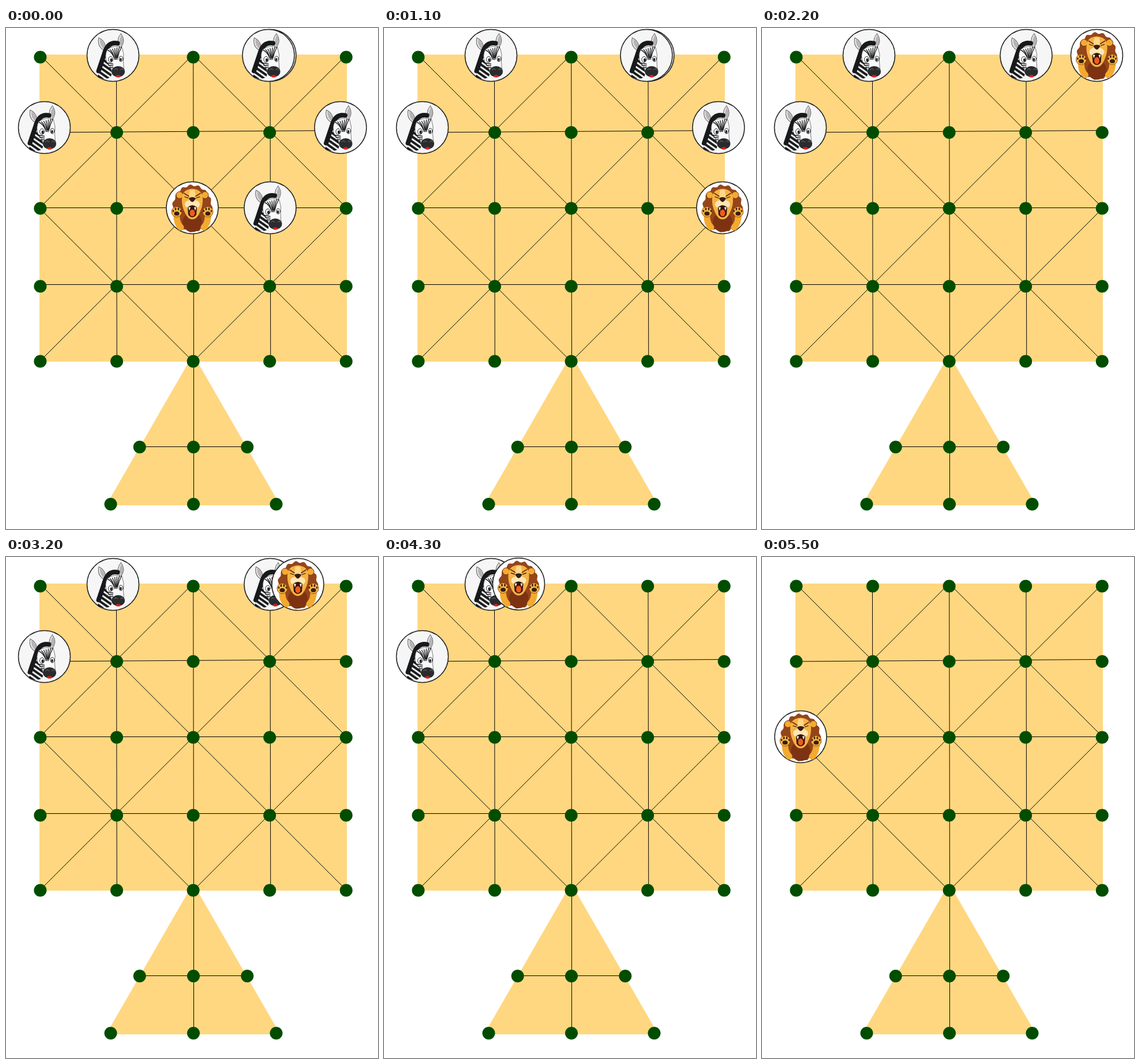
Write an HTML page that moves like this. It is 645x868 px and loops after 6500 ms.

```html
<!DOCTYPE html>
<html lang="en">
<head>
<meta charset="utf-8">
<title>Lion and zebras</title>
<style>
html, body { margin: 0; width: 100%; height: 100%; overflow: hidden; background: #fff; }
svg { display: block; width: 645px; height: 868px; }
</style>
</head>
<body>
<svg viewBox="0 0 645 868">
  <defs>
    <pattern id="stripes" width="7" height="7" patternUnits="userSpaceOnUse" patternTransform="rotate(35)">
      <path d="M0 0H7V4H0Z" fill="#1a1b1d"/>
    </pattern>
    <path id="leaf" d="M0 0Q-10-12 0-25Q10-12 0 0Z"/>
    <g id="ear">
      <use href="#leaf" fill="#e2e2e2" stroke="#555" stroke-width=".9"/>
      <use href="#leaf" transform="translate(1 -2) scale(.6 .8)" fill="#b9b1b4"/>
    </g>

    <g id="zebra" stroke-linecap="round" stroke-linejoin="round">
      <circle r="45" fill="#f6f6f6" stroke="#222" stroke-width="1.5"/>
      <use href="#ear" transform="translate(-14 -8) rotate(-25)"/>
      <use href="#ear" transform="translate(13 -13) rotate(2)"/>
      <path d="M-13-4Q-18 20-28 38Q-16 43-4 38L4 12Z" fill="#eee"/>
      <path d="M-13-4Q-18 20-28 38Q-16 43-4 38L4 12Z" fill="url(#stripes)"/>
      <path d="M8-21Q-8-24-14-6T-25 27" fill="none" stroke="#17191b" stroke-width="8"/>
      <path d="M-10-10Q3-20 16-13Q20-2 18 11L19 25Q12 34-2 29Q-4 18-11 11Q-15 0-10-10Z" fill="#fafafa" stroke="#444" stroke-width=".7"/>
      <path id="fan" fill="none" stroke="#202224" stroke-width="1.4"/>
      <g fill="#fff" stroke="#222">
        <ellipse cx="-4" cy="7" rx="4" ry="5"/>
        <ellipse cx="14" cy="6" rx="3.4" ry="4.6"/>
      </g>
      <g fill="#222">
        <ellipse cx="-3" cy="8" rx="2" ry="3"/>
        <ellipse cx="13.5" cy="7" rx="1.8" ry="2.8"/>
      </g>
      <ellipse cx="9" cy="28" rx="11.5" ry="9.5" fill="#2a2b2e"/>
      <path d="M2 25Q5 21 8 25M13 25Q16 21 18 25" fill="none" stroke="#77797d"/>
      <ellipse cx="9" cy="36" rx="4" ry="2.2" fill="#d4201c"/>
    </g>

    <g id="lion" stroke-linecap="round" stroke-linejoin="round">
      <circle r="45" fill="#fff" stroke="#222" stroke-width="1.5"/>
      <path id="mane" fill="#95451a"/>
      <ellipse cy="25" rx="17" ry="17" fill="#7d3312"/>
      <g id="side">
        <circle cx="-22" cy="-22" r="6" fill="#f3ab30" stroke="#7a3212"/>
        <path d="M-27 12Q-28 26-20 34" fill="none" stroke="#f3aa2e" stroke-width="11"/>
        <circle cx="-27" cy="7" r="9" fill="#f7b73f" stroke="#7a3212" stroke-width=".8"/>
        <ellipse cx="-27" cy="10" rx="4.5" ry="3.5" fill="#3a1d0d"/>
        <path d="M-33 5V6M-29 1V3M-24 1V3M-20 5V6" stroke="#3a1d0d" stroke-width="2.6"/>
      </g>
      <use href="#side" transform="scale(-1 1)"/>
      <path d="M0-33Q17-32 18-17Q19-4 13 8Q8 20 0 20Q-8 20-13 8Q-19-4-18-17Q-17-32 0-33Z" fill="#f5b344"/>
      <path d="M-4-31H4L7-16H-7Z" fill="#ffd789"/>
      <path d="M-14-25L-6-20M14-25L6-20" stroke="#6d2b0e" stroke-width="1.8"/>
      <path d="M-13-19L-7-17M13-19L7-17" stroke="#221408" stroke-width="1.3"/>
      <ellipse cy="-6" rx="13" ry="8" fill="#ffe6b5"/>
      <path d="M-6-17Q0-20 6-17Q4-11 0-10Q-4-11-6-17Z" fill="#3a1b10"/>
      <path d="M-8-1Q0-8 8-1L7 12Q0 21-7 12Z" fill="#351309"/>
      <ellipse cy="9" rx="4.5" ry="6" fill="#f15a1e"/>
      <path d="M-7-1H-3L-5 5ZM7-1H3L5 5Z" fill="#fff"/>
    </g>
  </defs>

  <path d="M58 46H591V578H58ZM324.5 565.5L475.5 827H173.5Z" fill="#ffd780"/>
  <path id="lines" fill="none" stroke="#000"/>
  <g id="dots" fill="#004d00"></g>
  <g id="pieces"></g>
</svg>
<script>
const HOLD = 1000, HOP = 100, LOOP = 6500, GAP = 48;
const $ = id => document.getElementById(id);
const range = n => [...Array(n).keys()];

function add(parent, tag, attrs) {
  const el = document.createElementNS("http://www.w3.org/2000/svg", tag);
  for (const key in attrs) el.setAttribute(key, attrs[key]);
  return parent.appendChild(el);
}

// Scalloped mane and the stripes that fan out over the zebra's brow
$("mane").setAttribute("d", "M" + range(120).map(i => {
  const a = i / 120 * 2 * Math.PI, r = 1 + 0.04 * Math.cos(15 * a);
  return `${34 * r * Math.cos(a)} ${1 + 40 * r * Math.sin(a)}`;
}).join("L") + "Z");
$("fan").setAttribute("d", range(7).map(i =>
  `M${-9 + 4 * i} ${-9 - i}Q${-2 + 2 * i} -6 ${2 + i} ${4 + 3 * (i % 2)}`).join("")
  + range(3).map(i => `M${-10 + 2 * i} ${13 + 4 * i}L0 ${15 + 3 * i}`).join(""));

// Board: a 4 x 4 lattice, with diagonals alternating from cell to cell
const gx = i => 58 + 133.25 * i, gy = j => 46 + 133 * j;
const path = [];
const line = (x1, y1, x2, y2) => path.push(`M${x1} ${y1}L${x2} ${y2}`);
for (const i of range(4)) for (const j of range(4)) {
  const odd = (i + j) % 2;
  line(gx(i), gy(j + odd), gx(i + 1), gy(j + 1 - odd));
}
for (const i of [1, 2, 3]) line(gx(i) + 0.2, 46, gx(i) + 1, 578);
line(58, 181, 591, 177.5);
for (const j of [2, 3]) line(58, gy(j) - 0.5, 591, gy(j) - 0.5);
line(325.5, 578, 325.5, 825);
line(231, 725.5, 418, 725.5);
$("lines").setAttribute("d", path.join(""));

const dot = (cx, cy) => add($("dots"), "circle", { cx, cy, r: 11 });
[50.5, 181, 312.5, 447.5, 577.5].forEach(y => range(5).forEach(i => dot(59.4 + 132.6 * i, y)));
for (const i of [-1, 0, 1]) {
  dot(325 + 93.3 * i, 726);
  dot(325 + 143.5 * i, 825);
}

// The lion takes prey[n] on its way from stops[n] to stops[n + 1].
const stops = [[323, 311.5], [587, 311.5], [580.5, 47.5], [323, 47.5], [67, 45.5], [67, 311.5]];
const prey = [[458, 311.5], [580, 172.5], [458, 47.5], [185.5, 47.5], [66.5, 172.5]];

const place = (el, [x, y]) => el.setAttribute("transform", `translate(${x} ${y})`);
function piece(kind, at) {
  const el = add($("pieces"), "use", { href: "#" + kind });
  place(el, at);
  return el;
}
const zebras = prey.map((at, taken) => ({ el: piece("zebra", at), taken }));
zebras.push({ el: piece("zebra", [455, 47.5]), taken: 1 });
const lion = piece("lion", stops[0]);

// Mid-hop, the lion shows just short of the zebra it jumps.
function leap(n) {
  const [x, y] = stops[n], [tx, ty] = stops[n + 1], [px, py] = prey[n];
  const f = (Math.hypot(px - x, py - y) - GAP) / Math.hypot(tx - x, ty - y);
  return [x + (tx - x) * f, y + (ty - y) * f];
}

function draw(t) {
  const n = Math.floor(t / (HOLD + HOP));
  const hopping = t % (HOLD + HOP) >= HOLD;
  place(lion, hopping ? leap(n) : stops[n]);
  for (const { el, taken } of zebras)
    el.setAttribute("visibility", n > taken ? "hidden" : "visible");
}

const start = performance.now();
function tick() {
  draw((performance.now() - start) % LOOP);
  requestAnimationFrame(tick);
}
tick();
</script>
</body>
</html>
```
